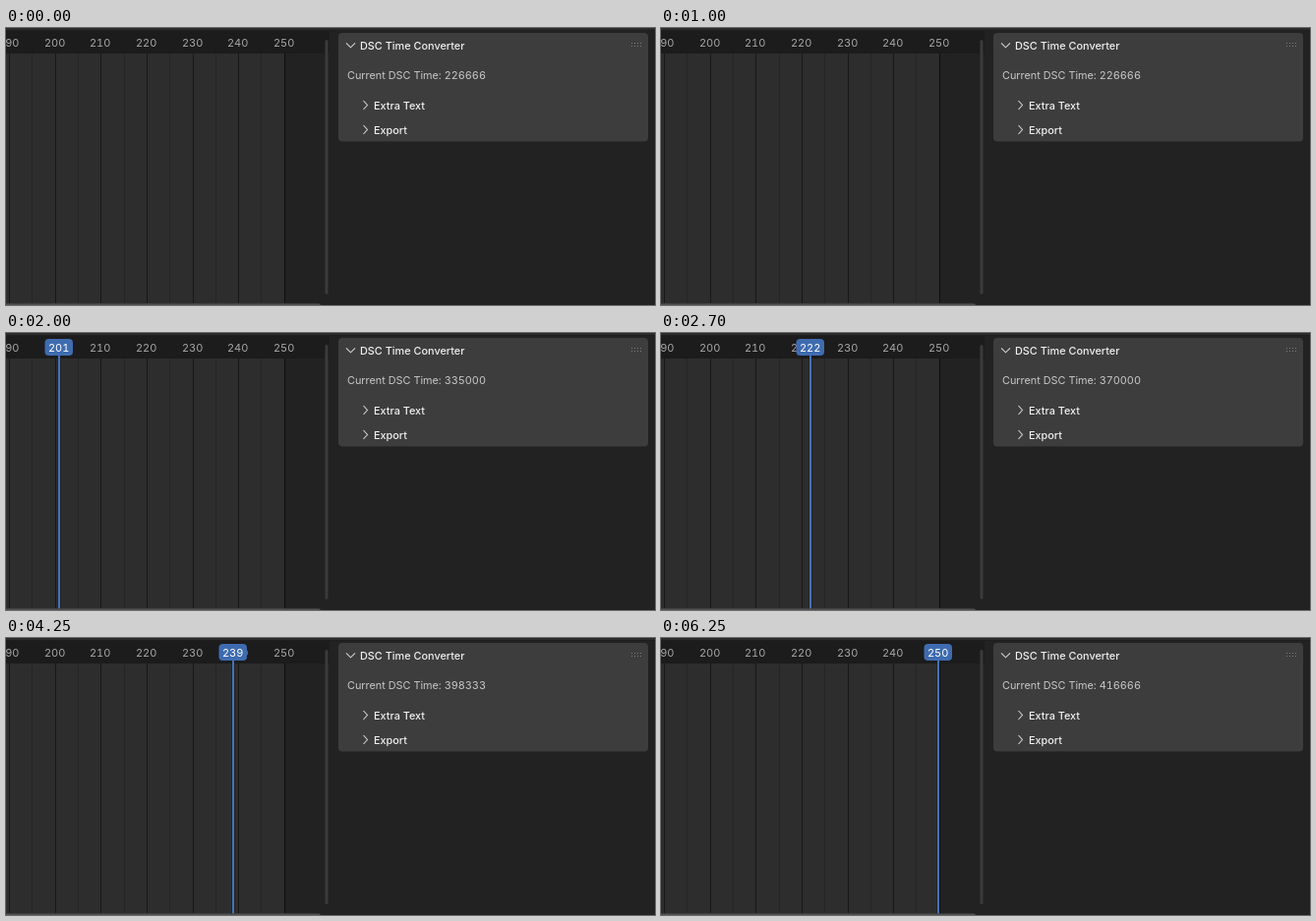
These frames come from a looping animation (660 by 282 pixels, 6850 ms). An HTML page:

```html
<!DOCTYPE html>
<html lang="en">
<head>
<meta charset="utf-8">
<title>Timeline playhead</title>
<style>
  html, body { margin: 0; width: 100%; height: 100%; overflow: hidden; background: #222; }
  svg { display: block; width: 660px; height: 282px; }
  text { font: 11px Inter, "Noto Sans", sans-serif; font-variant-numeric: tabular-nums; }
  .mid { text-anchor: middle; }
  .tick { fill: #a6a6a6; }
  .panel text { font-size: 10.87px; fill: #c8c8c8; }
  .panel .title { font-weight: 500; fill: #f0f0f0; }
  .chevron { fill: none; stroke: #d0d0d0; stroke-width: 1.1; }
</style>
</head>
<body>
<svg viewBox="0 0 660 282">
  <rect width="660" height="282" fill="#222"/>
  <rect y="26" width="283" height="256" fill="#2d2d2d"/>
  <rect y="3" width="329" height="23" fill="#1c1c1c"/>
  <rect width="660" height="2" fill="#2b2b2b"/>
  <rect y="2" width="660" height="1" fill="#1e1e1e"/>
  <g id="grid"></g>
  <rect x="324.5" y="12" width="3" height="259" rx="1.5" fill="#3b3b3b"/>
  <rect x="-4" y="280.4" width="324" height="4" rx="2" fill="#505050"/>

  <g id="playhead">
    <rect x="-2" y="22" width="4" height="258.5" fill="#1a1a1a" opacity=".4"/>
    <rect x="-1" y="22" width="2" height="258.5" fill="#4473b6"/>
    <rect x="-14.5" y="6" width="28.5" height="17" rx="4" fill="#3f6cb0"/>
    <text id="frame" class="mid" x="-0.4" y="19" fill="#fff" font-weight="500"></text>
  </g>

  <g class="panel">
    <rect x="338" y="5" width="315" height="110.5" rx="4" fill="#3d3d3d"/>
    <g id="grip" fill="#7c7c7c"></g>
    <path class="chevron" d="M346 15.3l4.5 4.5 4.5-4.5M363.5 74l4 4.5-4 4.5M363.5 99l4 4.5-4 4.5"/>
    <text class="title" x="360" y="22">DSC Time Converter</text>
    <text id="time" x="347" y="52"></text>
    <text class="title" x="374" y="83">Extra Text</text>
    <text class="title" x="374" y="108">Export</text>
  </g>
</svg>
<script>
  const LOOP = 6850;
  // [start in ms, current frame]
  const CUES = [[0, 136], [1450, 201], [2700, 222], [4000, 239], [5600, 250]];
  const FPS = 60, UNITS_PER_SECOND = 100000;

  const $ = id => document.getElementById(id);
  const frameX = frame => 50 + (frame - 200) * 4.66;

  function add(parent, tag, attrs, label) {
    const node = document.createElementNS("http://www.w3.org/2000/svg", tag);
    for (const key in attrs) node.setAttribute(key, attrs[key]);
    if (label !== undefined) node.textContent = label;
    parent.appendChild(node);
  }

  function buildGrid() {
    for (let frame = 190; frame <= 250; frame += 5) {
      const major = frame % 10 === 0;
      const x = Math.floor(frameX(frame) + 0.25);
      add($("grid"), "rect", {
        x, y: 26, width: 1, height: 254,
        fill: frame === 250 ? "#0e0e0e" : major ? "#171717" : "#252525"
      });
      if (major) add($("grid"), "text", { class: "mid tick", x: x - 0.3, y: 19 }, frame);
    }
  }

  function buildGrip() {
    for (let i = 0; i < 8; i++) {
      add($("grip"), "rect", { x: 636 + (i % 4) * 3, y: 15 + (i >> 2) * 3, width: 1, height: 1 });
    }
  }

  function render(ms) {
    const frame = CUES.filter(cue => cue[0] <= ms).pop()[1];
    const x = Math.floor(frameX(frame) - 0.4);
    $("playhead").setAttribute("transform", `translate(${x} 0)`);
    $("frame").textContent = frame;
    $("time").textContent = "Current DSC Time: " + Math.floor(frame * UNITS_PER_SECOND / FPS);
  }

  function tick() {
    render(performance.now() % LOOP);
    requestAnimationFrame(tick);
  }

  buildGrid();
  buildGrip();
  tick();
</script>
</body>
</html>
```
